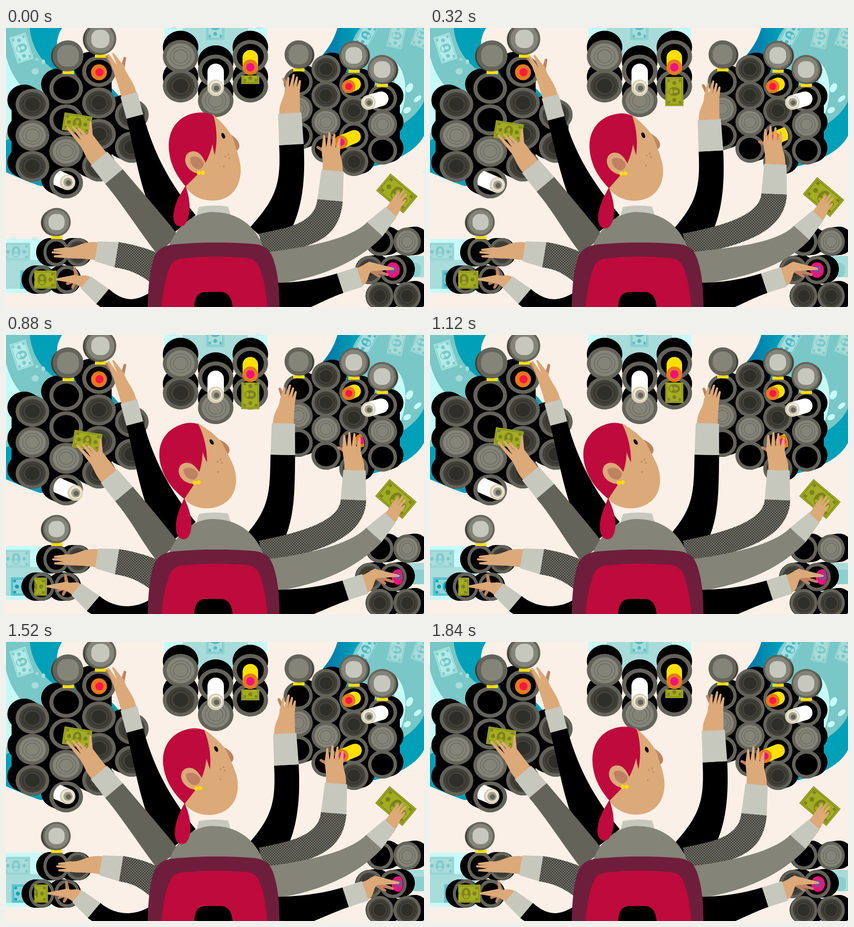
Recreate the animation shown at these times as an HTML page. Size 917x611 px, loop 1.92 s.

```html
<!DOCTYPE html>
<html lang="en">
<head>
<meta charset="utf-8">
<title>Many hands</title>
<style>
  html, body { margin: 0; width: 100%; height: 100%; overflow: hidden; background: #fbf0e7; }
  svg { display: block; width: 917px; height: 611px; }
</style>
</head>
<body>
<svg id="stage" viewBox="0 0 917 611"></svg>
<script>
const LOOP = 1920, STEP = 80;
const RING = '#63635a', GREY = '#848479', CUFF = '#c6c8be', SKIN = '#dca978', SHADE = '#be8262';
const RED = '#be0a3c', YELLOW = '#ffdf00', ORANGE = '#e8791b', PINK = '#f0127d', SCARLET = '#ff1746';
const PALE = '#c6faf8', MIST = '#a8dcda', TEAL = '#79c7c7', BLUE = '#00a0b8';
const GREEN = '#a2ad1f', OLIVE = '#7e7f22';

// Eased rise from 0 to 1 and back
const ease = (t, from, to) => {
  const u = Math.min(1, Math.max(0, (t - from) / (to - from)));
  return u * u * (3 - 2 * u);
};
const pulse = (t, up, top, down, end) => ease(t, up, top) - ease(t, down, end);

// Drawing helpers
const path = (d, fill, more = '') => `<path d="${d}" fill="${fill}" ${more}/>`;
const oval = (x, y, rx, ry, fill, more = '') =>
  `<ellipse cx="${x}" cy="${y}" rx="${rx}" ry="${ry}" fill="${fill}" ${more}/>`;
const dot = (x, y, r, fill) => oval(x, y, r, r, fill);
const leaf = (x, y, rx, ry, turn, fill) => oval(x, y, rx, ry, fill, `transform="rotate(${turn} ${x} ${y})"`);
const box = (x, y, w, h, fill, more = '') =>
  `<rect x="${x}" y="${y}" width="${w}" height="${h}" fill="${fill}" ${more}/>`;
const stroke = (x1, y1, x2, y2, width, color) =>
  `<path d="M${x1} ${y1}L${x2} ${y2}" stroke="${color}" stroke-width="${width}" stroke-linecap="round"/>`;
const group = (id, body) => `<g id="${id}">${body}</g>`;
const clipped = (id, body) => `<g clip-path="url(#${id})">${body}</g>`;

function bill(x, y, turn, size, fill = GREEN, ink = OLIVE) {
  const corners = [-27, 21].flatMap(cx => [-15, 10].map(cy => box(cx, cy, 6, 5, ink)));
  return `<g transform="translate(${x} ${y}) rotate(${turn}) scale(${size})">`
    + box(-32, -20, 64, 40, fill, `stroke="${ink}" stroke-width=".8"`)
    + box(-29, -17, 58, 34, 'none', `stroke="${ink}" stroke-width="1.2"`)
    + oval(0, 0, 10, 13, ink) + oval(0, -3, 4, 5, fill) + oval(0, 7, 6, 4, fill)
    + dot(-19, 0, 4.5, ink) + dot(19, 0, 4.5, ink) + corners.join('') + '</g>';
}

const paperRoll = (x1, y1, x2, y2, r) => stroke(x1, y1, x2, y2, 2 * r, '#fff')
  + dot(x2, y2, r, '#d9d1b5') + dot(x2 + 1, y2 - 1, r * .78, '#f1ead8')
  + dot(x2 + 1, y2, r * .6, '#a5a28f') + dot(x2 + 2, y2 + 1, r * .34, RING);
const candyRoll = (x1, y1, x2, y2, r, core) => stroke(x1, y1, x2, y2, 2 * r, YELLOW)
  + dot(x2, y2, r, ORANGE) + dot(x2, y2, r * .54, core);

// O is an open tube, D a dark cap, L a light cap.
function ring(x, y, rx, ry, kind) {
  const at = (k, fill, line) => oval(x, y, rx * k, ry * k, fill, line ? `stroke="${line}" stroke-width="1.6"` : '');
  if (kind === 'O') return at(1, RING) + at(.76, '#000');
  const [face, line] = kind === 'L' ? [GREY, '#6b6b62'] : ['#41413a', '#2f2f29'];
  return at(1, RING) + at(.79, face) + at(.58, face, line) + at(.4, kind === 'L' ? face : line, line);
}

// Each run is [x, y, stepX, stepY, kinds]; (dx, dy) is the depth of the tubes.
function cluster(runs, rx, ry, dx, dy) {
  let backs = '', rings = '';
  for (const [x0, y0, sx, sy, kinds] of runs) {
    const n = kinds.length - 1;
    for (const k of [0, 1])
      backs += stroke(x0 + k * dx, y0 + k * dy, x0 + n * sx + k * dx, y0 + n * sy + k * dy, rx * 1.5, '#000');
    [...kinds].forEach((kind, i) => {
      const x = x0 + i * sx, y = y0 + i * sy;
      backs += stroke(x, y, x + dx, y + dy, 2 * ry, '#000') + oval(x + dx, y + dy, rx, ry, '#000');
      rings += ring(x, y, rx, ry, kind);
    });
  }
  return backs + rings;
}

function lid(x, y, r, side, light) {
  const core = light ? .57 : .7;
  return box(x - 12, y + r - 1, 25, 7, YELLOW)
    + oval(x + side * 5, y + 1, r - 2, r - 2, '#34342e', `stroke="${RING}" stroke-width="2" stroke-dasharray="1.2 1.4"`)
    + dot(x, y, r, RING) + (light ? dot(x, y, r * .87, GREY) : '')
    + box(x - r * core, y - r * core, r * core * 2, r * core * 2, light ? CUFF : GREY, `rx="${r * core * .85}"`);
}

// Hands and cuffs lie along +x from the wrist; fingers fan out evenly from the palm.
function finger(x1, y1, w1, x2, y2, w2, fill) {
  const len = Math.hypot(x2 - x1, y2 - y1), nx = (y1 - y2) / len / 2, ny = (x2 - x1) / len / 2;
  return path(`M${x1 - nx * w1} ${y1 - ny * w1}L${x2 - nx * w2} ${y2 - ny * w2}`
    + `A${w2 / 2} ${w2 / 2} 0 0 1 ${x2 + nx * w2} ${y2 + ny * w2}L${x1 + nx * w1} ${y1 + ny * w1}Z`, fill);
}

function hand({ wrist, palm: [px, py, pw], tips, back = [], held = '' }) {
  const w = wrist * .45, h = pw / 2;
  const behind = back.map(([x, y]) => finger(px * .7, py * .8, 10, x, y, 6, SHADE)).join('');
  const front = tips.map(([x, y], i) =>
    finger(px - 5, py + pw * ((i + .5) / tips.length - .5), pw / tips.length + 1, x, y, 4.5, SKIN)).join('');
  return held + behind + front
    + path(`M-2 ${-w}C${px * .5} ${-w} ${px * .6} ${py - h} ${px} ${py - h}`
      + `Q${px + 5} ${py} ${px} ${py + h}C${px * .6} ${py + h} ${px * .5} ${w} -2 ${w}Z`, SKIN);
}

const cuff = ({ wrist, hem, length }) =>
  path(`M0 ${-wrist / 2}V${wrist / 2}L${-length} ${hem / 2}V${-hem / 2}Z`, CUFF);

// at: wrist, turn: direction of the hand, root: shoulder x, y, direction, width
const arms = [
  { id: 'l1', fill: '#000', at: [269.5, 145.5], turn: -105, length: 50, wrist: 38, hem: 38,
    root: [385, 435, -129, 80], reach: 90, bend: 0,
    palm: [66, -7, 25], tips: [[95, -21], [94, -10]], back: [[79, 12], [92, -25]],
    move: t => [-6, 4, 0].map(v => v * pulse(t, 0, 160, 600, 840)) },
  { id: 'l2', fill: RING, at: [204, 286], turn: -130, length: 51, wrist: 47, hem: 50,
    root: [355, 475, -128, 62], reach: 60, bend: 0,
    palm: [56, 5, 36], tips: [[97, -10], [90, 1], [79, 8], [73, 37]], held: bill(90, 13, 139, .96),
    move: t => [22, 23, 0].map(v => v * pulse(t, 0, 480, 960, 1440)) },
  { id: 'l3', fill: 'url(#tweed)', at: [198, 489], turn: 189.5, length: 45, wrist: 44, hem: 56,
    root: [345, 537, 216, 65], reach: 40, bend: 0,
    palm: [70, -14, 23], tips: [[88, -26], [94, -18], [91, -12]],
    move: t => [10 * pulse(t % 960, 0, 440, 560, 960), 0, 0] },
  { id: 'l4', fill: '#000', at: [175, 557], turn: 220, length: 48, wrist: 34, hem: 43,
    root: [325, 603, 150, 50], reach: 40, bend: 0,
    palm: [28, -10, 18], tips: [[53, -36]], back: [[38, 8], [29, -28], [15, -27]],
    move: t => [-25 * pulse(t, 0, 1200, 1360, 1840), 0, 0] },
  { id: 'r1', fill: '#000', at: [622.5, 186.5], turn: -93, length: 69, wrist: 51, hem: 54,
    root: [565, 462, -48, 78], reach: 85, bend: 0, slide: 1,
    palm: [54, 8, 33], tips: [[77, 1], [83, 13], [77, 20], [69, 26]], back: [[75, -9]],
    move: t => {
      const lean = pulse(t, 560, 880, 1200, 1520);
      return [-11 * pulse(t, 0, 400, 1520, LOOP) - 3 * lean, 14 * pulse(t, 0, 240, 1760, LOOP) - 7 * lean, 4 * lean];
    } },
  { id: 'r2', fill: 'url(#tweed)', at: [716.5, 312.5], turn: -85, length: 65, wrist: 49, hem: 56,
    root: [560, 475, -12, 50], reach: 75, bend: .25,
    palm: [50, -8, 40], tips: [[74, -25], [81, -14], [79, -3], [70, 9]], back: [[48, -37]],
    move: t => [48, -16.5, -3].map(v => v * pulse(t, 0, 420, 1280, 1600)) },
  { id: 'r3', fill: GREY, at: [846, 403], turn: -46.5, length: 52, wrist: 33, hem: 46,
    root: [577, 527, -8, 72], reach: 75, bend: .2,
    palm: [29, -5, 26], tips: [[42, -17], [51, -12], [50, -3], [40, 5]], held: bill(38, -19, 86.5, 1.2),
    move: t => {
      const lift = pulse((t + STEP) % LOOP, 0, 240, 480, 960);
      return [8 * lift - 3, 11 * lift - 3, 0];
    } },
  { id: 'r4', fill: '#000', at: [776, 545], turn: -18, length: 45, wrist: 45, hem: 45,
    root: [590, 596, 0, 76], reach: 45, bend: 0,
    palm: [32, -15, 20], tips: [[75, 6]], back: [[41, 12], [59, 14]],
    move: t => [12 * pulse(t, 600, 860, 1640, LOOP), 0, 0] }
];

const defs = `<defs>
  <pattern id="tweed" width="6" height="6" patternUnits="userSpaceOnUse">
    ${box(0, 0, 6, 6, '#6d6d64')}${dot(1.5, 1.5, 1.1, '#000')}${dot(4.5, 4.5, 1.1, '#000')}
  </pattern>
  <linearGradient id="deep"><stop stop-color="#006fa6"/><stop offset=".35" stop-color="${BLUE}"/></linearGradient>
  <clipPath id="slotNote">${box(500, 104, 80, 100, '#000')}</clipPath>
  <clipPath id="slotBill">${box(62, 520, 100, 60, '#000')}</clipPath>
  <clipPath id="slotCandy">${box(650, 200, 110, 90, '#000')}${oval(760, 238, 26, 28, '#000')}</clipPath>
  <clipPath id="slotRoll">${oval(130, 337, 26, 27, '#000')}${box(130, 300, 60, 80, '#000')}</clipPath>
  <clipPath id="slotPink">${oval(849, 530, 22, 24, '#000')}</clipPath>
</defs>`;

const scenery =
  // upper left pipe
  path('M0 0H123C110 20 104 50 130 80C180 92 228 118 252 156L240 250C190 310 120 345 75 346C45 336 15 322 0 316Z', BLUE)
  + path('M0 0H52C56 40 76 75 112 96L100 200L0 246Z', TEAL)
  + path('M0 62C8 92 20 112 34 128L20 200L0 232Z', PALE)
  + bill(34, 44, 72, .94, '#b2eae8', TEAL)
  + oval(64, 95, 8, 7, MIST) + oval(82, 74, 4, 5, MIST) + dot(68, 69, 3, MIST)
  // top pipe
  + box(347, 0, 226, 30, PALE) + box(388, 0, 143, 60, MIST) + bill(459, -5, 90, .95, MIST, '#55b9c1')
  // upper right pipe
  + path('M727 0C720 25 706 48 688 66L790 306C850 296 900 270 917 236V0Z', 'url(#deep)')
  + path('M777 0C752 30 748 70 760 110L860 216C890 200 908 180 917 160V0Z', TEAL)
  + path('M842 66C882 84 884 150 864 194L852 180V90Z', PALE)
  + bill(790, 16, -62, .85, '#a3dedf', '#4fb6c1') + bill(857, 17, 102, .85, MIST, TEAL)
  + bill(912, 16, 110, .85, MIST, TEAL)
  + leaf(885, 131, 7, 11, 30, PALE) + leaf(903, 155, 10, 5, -40, PALE) + leaf(880, 180, 9, 6, -30, PALE)
  // lower pipes
  + box(0, 462, 100, 60, PALE) + box(0, 508, 100, 14, MIST) + bill(22, 490, 0, .95, MIST, '#7fcaca')
  + box(0, 522, 100, 58, MIST) + box(0, 571, 100, 9, PALE)
  + group('paid', bill(63, 551, 0, .97, '#8fd4d6', BLUE))
  + box(880, 499, 37, 47, MIST) + group('drop', box(860, 514, 50, 31, '#8bcfce', 'rx="10"'));

const tubes =
  cluster([[276, 190, 0, 71, 'DD'], [204, 95, 0, 69, 'ODDD'], [132, 132, 0, 69, 'OOLO'], [58, 167, 0, 68, 'DLD']], 37, 34, -18, -9)
  + dot(204, 97, 17.5, ORANGE) + dot(205, 97, 9, SCARLET)
  + clipped('slotRoll', group('roll', paperRoll(98, 322, 135, 338, 17)))
  + lid(136, 61, 34, -1, false) + lid(207, 24, 35, -1, true)

  + cluster([[383, 62, 0, 65, 'LD'], [460, 94, 0, 65, 'OL'], [536, 62, 0, 65, 'OO']], 39, 36, 0, -20)
  + paperRoll(460, 96, 460, 131, 18)
  + clipped('slotNote', group('note', bill(536, 91, 90, .98)))
  + candyRoll(536, 65, 536, 86, 17, PINK)

  + cluster([[641, 118, 0, 59, 'OLO'], [702, 90, 0, 58, 'DDLO'], [763, 125, 0, 56, 'ODOD'], [826, 154, 0, 57, 'OLO']], 32, 31, 14, -5)
  + candyRoll(764, 123, 752, 128, 14.5, SCARLET)
  + paperRoll(823, 155, 795, 163, 16)
  + clipped('slotCandy', group('candy', candyRoll(764, 238, 735, 250, 14.5, PINK)))
  + lid(642, 58, 31, 1, false) + lid(763, 60, 32, 1, true) + lid(825, 91, 32, 1, true)

  + cluster([[158, 491, -48, 0, 'DO'], [134, 551, -56, 0, 'OO']], 28, 31, -13, 0)
  + clipped('slotBill', group('cash', bill(79, 551, 0, .98)))
  + lid(111, 425, 31, -1, true)

  + cluster([[820, 468, 60, 0, 'OL'], [797, 530, 52, 0, 'DO'], [820, 587, 60, 0, 'DD']], 30, 31, 17, -2)
  + clipped('slotPink', group('pink', oval(849, 530, 15, 17, PINK) + dot(849, 529, 8, '#7c4f93')));

const limbs = arms.map(a => `<path id="${a.id}-sleeve" fill="${a.fill}"/>` + group(a.id, hand(a) + cuff(a))).join('');

const torso =
  path('M418 410L423 392Q455 386 487 391L493 410Z', CUFF)
  + path('M355 485C372 432 415 403 453 403C500 403 548 425 568 490Z', GREY)
  + path('M311 611C312 560 317 520 326 500C334 482 350 476 368 474Q455 466 545 473C570 476 580 488 586 505C597 535 600 575 600 611Z', '#6e1e3b')
  + path('M341 611C345 568 352 540 360 522Q367 508 383 505Q455 497 530 504Q548 507 555 522C567 550 571 580 573 611Z', RED)
  + path('M413 611C414 588 422 578 440 578H470C487 578 495 590 497 611Z', '#000');

const face = group('head',
  path('M494 234C508 243 516 256 510 265Q506 271 496 271Z', SHADE)
  + path('M440 190H455C475 208 493 228 500 246C503 262 514 285 515 310C515 352 490 378 453 378C428 378 405 366 394 347L410 260Z', SKIN)
  + path('M428 185Q443 185 455 192C463 218 464 250 458 278Q455 268 453 254C448 275 440 296 421 320L394 347C371 320 357 292 357 256C358 214 386 186 428 185Z', RED)
  + path('M411 270C424 270 432 282 438 296L428 318Q416 320 407 313C397 306 393 296 393 288C394 276 401 270 411 270Z', SKIN)
  + path('M404 284C412 278 428 282 434 296Q434 306 423 310C410 307 403 297 404 284Z', SHADE)
  + dot(423, 317, 4.5, YELLOW) + dot(432, 317, 4.5, YELLOW)
  + leaf(476.5, 236, 3.6, 6.6, -22, '#000')
  + [[481, 281], [488, 277], [490, 285], [478, 303]].map(p => dot(...p, 1.8, SHADE)).join('')
  + group('tail', path('M394 345C400 362 405 382 404 400C402 424 394 435 384 435C373 434 368 424 369 408C371 384 382 366 394 345Z', RED)));

document.getElementById('stage').innerHTML = defs + scenery + tubes + limbs + torso + face;

const place = (id, transform) => document.getElementById(id).setAttribute('transform', transform);
const slide = (id, x, y = 0) => place(id, `translate(${x} ${y})`);

// The two edges of a limb end: corners, and handles pointing along the limb.
function limbEnd(x, y, turn, width, reach, bend) {
  const a = turn * Math.PI / 180, c = Math.cos(a), s = Math.sin(a);
  return [-1, 1].map(side => {
    const cx = x - side * s * width / 2, cy = y + side * c * width / 2, r = reach * (1 + side * bend);
    return { corner: `${cx} ${cy}`, handle: `${cx + c * r} ${cy + s * r}` };
  });
}

function poseArm(a, t) {
  const [dx, dy, tilt] = a.move(t), x = a.at[0] + dx, y = a.at[1] + dy, turn = a.turn + tilt;
  place(a.id, `translate(${x} ${y}) rotate(${turn})`);
  const rad = turn * Math.PI / 180, [rx, ry, rootTurn, width] = a.root, drag = a.slide || 0;
  const near = limbEnd(x - a.length * Math.cos(rad), y - a.length * Math.sin(rad), turn, a.hem, -a.reach, a.bend);
  const far = limbEnd(rx + drag * dx, ry + drag * dy, rootTurn, width, a.reach, a.bend);
  document.getElementById(a.id + '-sleeve').setAttribute('d',
    `M${near[0].corner}C${near[0].handle} ${far[0].handle} ${far[0].corner}`
    + `L${far[1].corner}C${far[1].handle} ${near[1].handle} ${near[1].corner}Z`);
  return dx;
}

function pose(t) {
  const shift = Object.fromEntries(arms.map(a => [a.id, poseArm(a, t)]));
  const turn = -10.9 * pulse(t, 60, 720, 1220, LOOP);
  place('head', `rotate(${turn} 455 368)`);
  place('tail', `rotate(${1.5 - .3 * turn} 394 347)`);
  const pull = 45 * pulse(t, 0, 720, 960, 1600);
  slide('candy', pull, -.42 * pull);
  slide('note', 0, 48 * pulse(t, 0, 280, 560, 1760));
  slide('roll', .77 * shift.l2, .36 * shift.l2);
  slide('cash', shift.l4);
  slide('paid', shift.l4);
  slide('pink', shift.r4);
  slide('drop', shift.r4);
}

const start = performance.now();
function tick() {
  const t = (performance.now() - start) % LOOP;
  pose(Math.floor(t / STEP) * STEP);
  requestAnimationFrame(tick);
}
tick();
</script>
</body>
</html>
```
